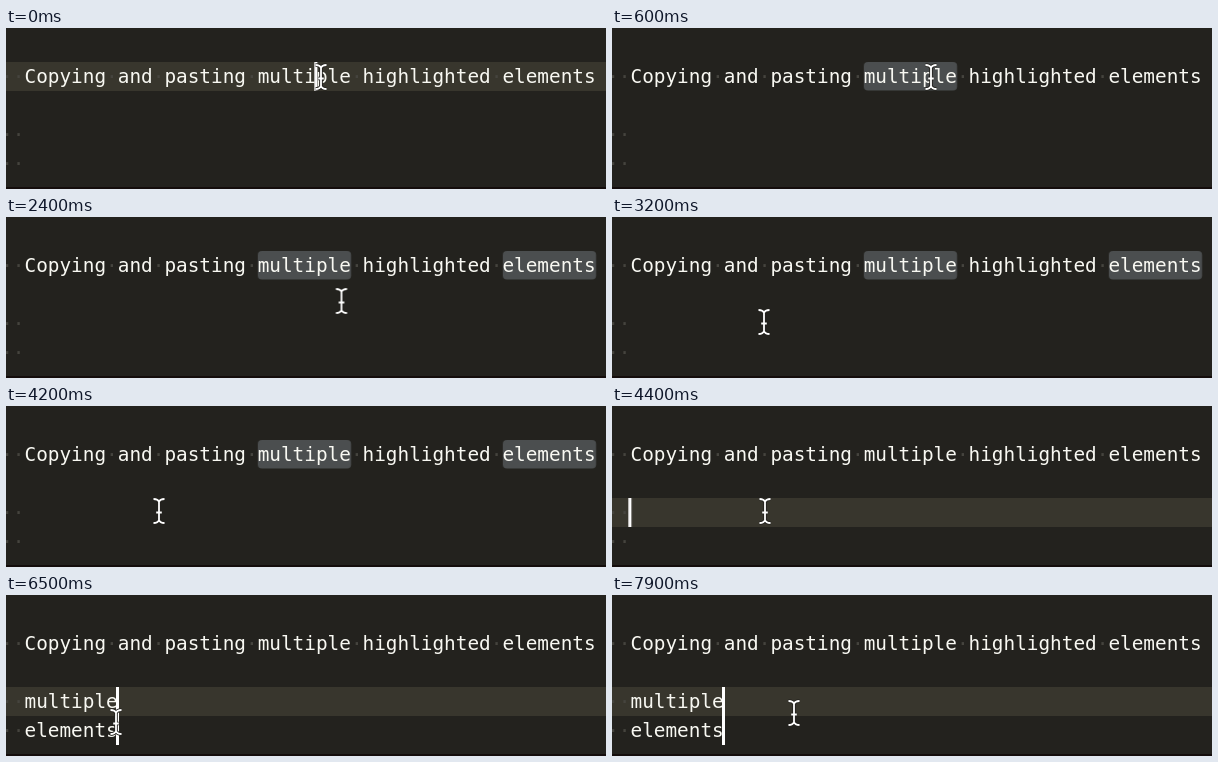
Animation, 600 px wide and 161 px high, one loop 8000 ms. Source, as an HTML page:

```html
<!DOCTYPE html>
<html lang="en">
<head>
<meta charset="utf-8">
<title>Multiple selection copy and paste</title>
<style>
  html, body { margin: 0; width: 100%; height: 100%; overflow: hidden; background: #23221e; }
  svg { display: block; width: 600px; height: 161px; }
  text { font: 19.38px "DejaVu Sans Mono", monospace; fill: #f8f8f2; }
  .dot { fill: #45443e; }
  .band { fill: #38362d; }
  .sel { fill: #4b4e4f; }
  .caret { fill: #fff; }

  /* Every change is a hard step on one shared 8 s clock */
  .word1, .word2, .click1, .click2, .line1, .line3, .column, .pasted, .blink, .mouse {
    animation: 8s step-end infinite;
  }
  .line1, .click1 { animation-name: opening; }
  .word1 { animation-name: word1; }
  .click2 { animation-name: click2; }
  .word2 { animation-name: word2; }
  .line3 { animation-name: line3; }
  .start { animation-name: start; }
  .column { animation-name: column; }
  .pasted { animation-name: pasted; }
  .blink { animation-name: blink; }
  .mouse { animation-name: mouse; }
  .start { animation: start 8s step-end infinite; }

  @keyframes opening { 0% { opacity: 1 } 1.25%, 100% { opacity: 0 } }
  @keyframes word1 { 0% { opacity: 0 } 1.25% { opacity: 1 } 55%, 100% { opacity: 0 } }
  @keyframes click2 { 0% { opacity: 0 } 18.75% { opacity: 1 } 21.25%, 100% { opacity: 0 } }
  @keyframes word2 { 0% { opacity: 0 } 21.25% { opacity: 1 } 55%, 100% { opacity: 0 } }
  @keyframes line3 { 0% { opacity: 0 } 55%, 100% { opacity: 1 } }
  @keyframes start { 0% { opacity: 0 } 55% { opacity: 1 } 81.25%, 100% { opacity: 0 } }
  @keyframes column { 0% { opacity: 0 } 65% { opacity: 1 } 81.25%, 100% { opacity: 0 } }
  @keyframes pasted { 0% { opacity: 0 } 81.25%, 100% { opacity: 1 } }

  @keyframes blink {
    0%, 13.75%, 33.75%, 46.25%, 55%, 65%, 77.5%, 93.75%, 100% { opacity: 1 }
    7.5%, 27.5%, 40%, 52.5%, 61.25%, 71.25%, 87.5% { opacity: 0 }
  }

  @keyframes mouse {
    0% { transform: translate(315px, 49px) }
    7.5% { transform: translate(319px, 49px) }
    8.75% { transform: translate(348px, 50px) }
    10% { transform: translate(404px, 51px) }
    11.25% { transform: translate(464px, 52px) }
    12.5% { transform: translate(505px, 52px) }
    13.75% { transform: translate(516px, 51px) }
    27.5% { transform: translate(504px, 53px) }
    28.75% { transform: translate(430px, 66px) }
    30% { transform: translate(335.5px, 84px) }
    31.25% { transform: translate(255px, 95px) }
    32.5% { transform: translate(200px, 101px) }
    33.75% { transform: translate(170px, 104px) }
    35% { transform: translate(156px, 105px) }
    36.25% { transform: translate(151px, 105px) }
    40% { transform: translate(152px, 105px) }
    43.75% { transform: translate(153px, 105px) }
    58.75% { transform: translate(149px, 107px) }
    60% { transform: translate(126px, 119px) }
    61.25% { transform: translate(110px, 127px) }
    93.75% { transform: translate(113px, 126px) }
    95% { transform: translate(130px, 122px) }
    96.25% { transform: translate(157px, 119px) }
    97.5% { transform: translate(176px, 118px) }
    98.75%, 100% { transform: translate(182px, 118px) }
  }
</style>
</head>
<body>
<svg viewBox="0 0 600 161">
  <defs>
    <rect id="caret" x="-1.8" width="3" height="29"/>
    <rect id="selection" width="93.3" height="28.5" rx="4"/>
    <path id="beam" d="M-5.5-12Q-1-12 0-9Q1-12 5.5-12M0-9V9M-5.5 12Q-1 12 0 9Q1 12 5.5 12M-2.8 1.5H2.8" fill="none"/>
  </defs>

  <rect width="600" height="161" fill="#23221e"/>
  <rect y="159" width="600" height="2" fill="#140d0c"/>

  <rect class="band line1" y="34" width="600" height="29"/>
  <rect class="band line3" y="92" width="600" height="29"/>
  <use class="sel word1" href="#selection" x="251.8" y="34"/>
  <use class="sel word2" href="#selection" x="496.8" y="34"/>

  <text x="-4.8" y="55"><tspan class="dot">··</tspan>Copying<tspan class="dot">·</tspan>and<tspan class="dot">·</tspan>pasting<tspan class="dot">·</tspan>multiple<tspan class="dot">·</tspan>highlighted<tspan class="dot">·</tspan>elements</text>
  <text class="dot" x="-4.8" y="113">··</text>
  <text class="dot" x="-4.8" y="142">··</text>
  <g class="pasted">
    <text x="18.5" y="113">multiple</text>
    <text x="18.5" y="142">elements</text>
  </g>

  <g class="caret blink">
    <use class="click1" href="#caret" x="310.2" y="34"/>
    <use class="word1" href="#caret" x="345.4" y="34"/>
    <use class="click2" href="#caret" x="520" y="34"/>
    <use class="word2" href="#caret" x="590" y="34"/>
    <use class="start" href="#caret" x="18.2" y="92"/>
    <use class="column" href="#caret" x="18.2" y="121"/>
    <g class="pasted">
      <use href="#caret" x="111.8" y="92"/>
      <use href="#caret" x="111.8" y="121"/>
    </g>
  </g>

  <g class="mouse">
    <use href="#beam" stroke="#23221e" stroke-width="3.6"/>
    <use href="#beam" stroke="#fff" stroke-width="1.8"/>
  </g>
</svg>
</body>
</html>
```
